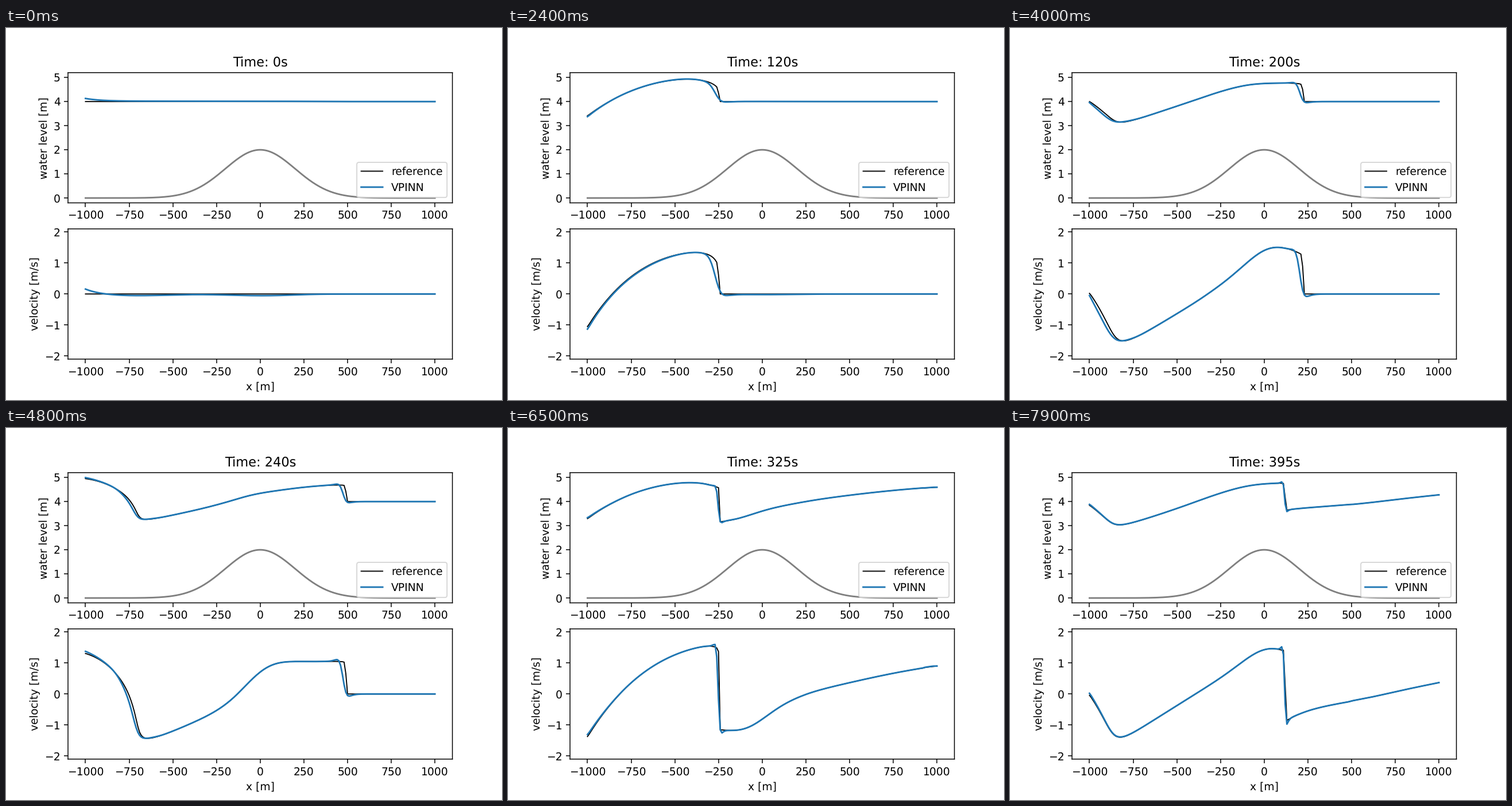
A matplotlib script that plays this animation: 864 px wide and 648 px high, repeating every 8000 ms.

```python
import numpy as np
import matplotlib.pyplot as plt
from matplotlib.animation import FuncAnimation

plt.rcParams.update({"text.hinting": "none", "path.snap": False})

FRAMES, INTERVAL, STEP = 80, 100, 5.0  # STEP: simulated seconds per frame
G, MANNING = 9.81, 0.04
DX, DT = 2.5, 0.125
SKIP = 4  # plot every 10 m


def bed(x):
    return 2 * np.exp(-x**2 / 80000)


x = np.arange(-1000, 1000 + DX / 2, DX)
b = bed(x)
face_b = bed(np.append(x - DX / 2, x[-1] + DX / 2))
bed_slope = np.diff(face_b) / DX


# ---- shallow water solver (MUSCL, HLL, Heun) ----
def faces(q):
    p = np.concatenate(([q[0]] * 2, q, [q[-1]] * 2))
    d = np.diff(p)
    lo, hi = d[:-1], d[1:]
    size = np.minimum(2 * np.minimum(abs(lo), abs(hi)), abs(lo + hi) / 2)
    slope = np.where(lo * hi > 0, np.sign(lo) * size, 0)
    mid = p[1:-1]
    return (mid + slope / 2)[:-1], (mid - slope / 2)[1:]


def side(eta, u):
    h = eta - face_b
    m = h * u
    return m, m * u + G / 2 * (eta**2 - 2 * eta * face_b), np.sqrt(G * h)


def rates(eta, m):
    h = eta - b
    u = m / h
    (el, er), (ul, ur) = faces(eta), faces(u)
    ml, pl, cl = side(el, ul)
    mr, pr, cr = side(er, ur)
    sl, sr = np.minimum(ul - cl, ur - cr), np.maximum(ul + cl, ur + cr)

    def hll(fl, fr, ql, qr):
        return (sr * fl - sl * fr + sl * sr * (qr - ql)) / (sr - sl)

    d_eta = -np.diff(hll(ml, mr, el, er)) / DX
    d_m = -np.diff(hll(pl, pr, ml, mr)) / DX - G * eta * bed_slope
    return d_eta, d_m - G * MANNING**2 * u * abs(u) / np.cbrt(h)


def inflow(eta, m, t):
    """Tidal level on the left, velocity from the outgoing characteristic."""
    h1 = eta[1] - b[1]
    eta[0] = 4 + np.sin(2 * np.pi * t / 200)
    h0 = eta[0] - b[0]
    m[0] = h0 * (m[1] / h1 + 2 * (np.sqrt(G * h0) - np.sqrt(G * h1)))


def solve():
    eta, m = np.full_like(x, 4.0), np.zeros_like(x)
    per_frame = round(STEP / DT)
    states = [(eta.copy(), m / (eta - b))]
    for k in range(1, (FRAMES - 1) * per_frame + 1):
        t = k * DT
        a1, a2 = rates(eta, m)
        e1, m1 = eta + DT * a1, m + DT * a2
        inflow(e1, m1, t)
        c1, c2 = rates(e1, m1)
        eta, m = eta + DT / 2 * (a1 + c1), m + DT / 2 * (a2 + c2)
        inflow(eta, m, t)
        if k % per_frame == 0:
            states.append((eta.copy(), m / (eta - b)))
    return states


# ---- network approximation: softened, lagging fronts plus slow errors ----
offsets = np.arange(-400, 400 + DX / 2, DX)


def gauss(s):
    k = np.exp(-offsets**2 / (2 * s * s))
    return k / k.sum()


def soften(q, pos, width, lag, ring):
    kernel = (1 + ring) * gauss(width) - ring * gauss(3 * width)
    blur = np.convolve(np.pad(q, len(offsets) // 2, mode="edge"), kernel, "valid")
    near = np.exp(-((x - pos) / max(80, 8 * width))**4)
    near *= 1 - np.exp(-(x + 1000) / 30)
    return q + near * (np.interp(x + lag, x, blur) - q)


def fronts(t):
    """Position, width, lag and ringing of the two travelling fronts."""
    def ring(age):
        return 0.4 * (1 - np.exp(-(age / 150)**2))

    yield 6.25 * t - 1000, 12 + 55 * np.exp(-t / 80), 17, ring(t)
    age = t - 183
    if age > 0:
        yield 5.25 * age - 1000, 4 + 20 * np.exp(-age / 80), 18 - 0.07 * age, ring(age)


def predict(eta, u, t):
    for front in fronts(t):
        eta, u = soften(eta, *front), soften(u, *front)
    fade = np.exp(-(t / 120)**2) / (1 + np.exp((x - 250) / 100))
    ripple = 1 + 0.5 * np.cos(2 * np.pi * (x + 750) / 800)
    inlet = 0.07 * np.cos(2 * np.pi * t / 80) + 0.12 * np.exp(-t / 15)
    inlet = inlet * np.exp(-(x + 1000) / 90)
    return eta + 0.6 * inlet + 0.015 * fade, u + inlet - 0.04 * ripple * fade


exact = solve()
approx = [predict(*s, i * STEP) for i, s in enumerate(exact)]

# ---- figure ----
fig, (top, low) = plt.subplots(2, 1, figsize=(6.4, 4.8), dpi=135)
xs = x[::SKIP]


def pair(ax):
    ref, = ax.plot(xs, 0 * xs, color="black", lw=1, label="reference")
    net, = ax.plot(xs, 0 * xs, color="tab:blue", lw=1.5, label="VPINN")
    return ref, net


top.plot(xs, b[::SKIP], color="tab:gray", lw=1.5)
lines = [pair(top), pair(low)]
title = top.set_title("Time: 0s")
top.set(ylim=(-0.2, 5.2), yticks=range(6), ylabel="water level [m]")
low.set(ylim=(-2.1, 2.1), yticks=range(-2, 3), xlabel="x [m]", ylabel="velocity [m/s]")
for ax in (top, low):
    ax.set(xlim=(-1100, 1100), xticks=range(-1000, 1001, 250))
top.legend(loc="lower right")


def update(i):
    for (ref, net), r, n in zip(lines, exact[i], approx[i]):
        ref.set_ydata(r[::SKIP])
        net.set_ydata(n[::SKIP])
    title.set_text(f"Time: {i * STEP:.0f}s")
    return [title, *lines[0], *lines[1]]


anim = FuncAnimation(fig, update, frames=FRAMES, interval=INTERVAL,
                     repeat=True, repeat_delay=0)
plt.show()
```
